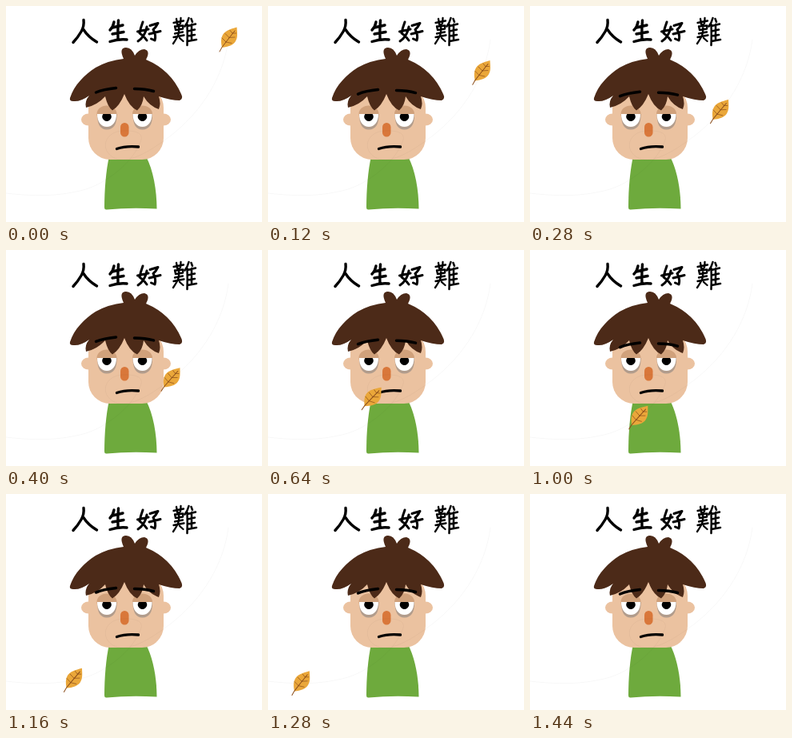
Recreate the animation shown at these times as an HTML page. Size 320x270 px, loop 1800 ms.

```html
<!DOCTYPE html>
<html lang="zh-Hant">
<head>
<meta charset="utf-8">
<title>人生好難</title>
<style>
  html, body { margin: 0; width: 100%; height: 100%; overflow: hidden; background: #fff; }
  svg { display: block; width: 100%; height: 100%; }
  .ink { fill: none; stroke: #000; stroke-linecap: round; stroke-linejoin: round; }
</style>
</head>
<body>
<svg viewBox="0 0 320 270">
  <defs>
    <g id="eye">
      <ellipse cy="135" rx="12.5" ry="10.5" fill="#d0a17b"/>
      <path d="M-12 135H12.5C13 148 8 154.500 0 154.500S-12 148-12 135Z" fill="#b19c8c"/>
      <path d="M-12 135H12C12 145 7 151 0 151S-12 145-12 135Z" fill="#fff"/>
      <path d="M-4.6 135H4.6A5.6 5.6 0 1 1-4.6 135Z"/>
    </g>
  </defs>

  <!-- hand lettering -->
  <g class="ink" role="img" aria-label="人生好難" stroke-width="3">
    <path stroke-width="3.4" d="M97 17.5Q98 25 94 32T84 45.5M96.5 29Q103 39 113.5 45"/>
    <path stroke-width="3.4" d="M135 20Q134 26 130 30M133 27L146 24M133 35L147 32.5M140.5 18Q139.5 30 140 42M130 44.5Q140 41 151 42"/>
    <path d="M171 20Q168 28 167 34Q172 37 176 43M176 26Q174 38 165 44M164.5 32L178 29M180 24.5L190 21.5Q188 26 184 29.5Q188 36 186 43L181.5 41M179 35L193 31.5"/>
    <path stroke-width="2.3" d="M209.5 21L222 18.5M213 16L214 23M218.5 15L218 22M211 25.5L212 30L221 28.5L221.5 24.5ZM216 23Q217 34 214 39T209 47M211 34.5L221 32.5M209.5 39L222.5 36.5M217 40L221.5 44"/>
    <path stroke-width="2.5" d="M228.5 15Q227 21 223.5 25.5M226.5 23Q227 36 226.5 49M231.5 16L233 20M227 25L237 22.5M227 31.5L236 29.5M227 37.5L236 36M227 44L238 42M232 23L232 43"/>
  </g>

  <!-- body -->
  <path d="M129 188C125 205 123 230 123 252Q123 255 126 254.500Q155 251.500 188.500 253.500C188.500 230 184 205 175 188Z" fill="#6eaa3d"/>
  <g fill="#ebc2a0">
    <ellipse cx="103" cy="142" rx="9" ry="7.5"/>
    <ellipse cx="197" cy="142" rx="9" ry="7.5"/>
    <rect x="103" y="100" width="94" height="92" rx="27"/>
  </g>
  <use href="#eye" x="126"/>
  <use href="#eye" x="170.5"/>
  <rect x="143" y="146" width="10.5" height="17.5" rx="5.2" fill="#d9773a"/>
  <path class="ink" stroke-width="3.4" d="M138.500 178.500Q150 174.500 165.500 176"/>

  <path fill="#4c2a18" d="M80 115C85 99 98 86 112 77Q128 68 147 66Q141 53 149 52T161 62Q166 54 173 54Q181 56 175 67Q206 80 219 110Q222 116 217 118Q206 118 191 113Q194 122 191 129Q179 125 172 113Q171 124 164 130.500Q154 126 148 110Q142 125 133 130.500Q127 126 124 113Q114 124 100 127Q98 119 104 112Q93 120 84 119Q79 119 80 115Z"/>
  <path id="brows" class="ink" stroke-width="3.5" d="M112.500 108Q122 104 137.500 102.500M160.500 103.500Q174 103.500 184.500 106.500"/>

  <!-- flight line, also faintly visible -->
  <path id="flight" fill="none" stroke="#000" stroke-opacity=".03" d="M278 42C272 88 246 130 208 160.500C185 178 155 199 135.500 190C117 181 122 157 146 156S172 163 167 172.500C156 198 122 224 94.500 230.500C60 239 28 238-16 232"/>

  <g id="leaf">
    <path d="M10.500-15.500C2-13-4-11-7-6S-9 5-8 10C0 9 6 7 9 2S11-8 10.500-15.500Z" fill="#eaa73a"/>
    <g fill="none" stroke="#8b4d1b" stroke-linecap="round" stroke-width=".7">
      <path stroke-width="1" d="M8-11Q0-1-8 9.500L-11 15"/>
      <path d="M5-8L2-11.500M1-2.500L-4-7.500M-3 3L-8-2M5-8L9.500-8M1-2.500L8-3M-3 3L4 4.500"/>
    </g>
  </g>
</svg>
<script>
const LOOP = 1800, STEP = 40, FALL = 1440;
const [flight, leaf, brows] = ['flight', 'leaf', 'brows'].map(id => document.getElementById(id));
const length = flight.getTotalLength();

function draw(now) {
  const t = Math.floor(now % LOOP / STEP) * STEP;
  const p = Math.min(1, t / FALL);

  // the leaf keeps a constant speed and leans a little in mid-flight
  const { x, y } = flight.getPointAtLength(length * p);
  const lean = 6 * Math.sin(Math.PI * p) ** 2;
  leaf.setAttribute('transform', `translate(${x} ${y}) rotate(${lean})`);

  // the brows sink and slow down
  brows.setAttribute('transform', `translate(0 ${17 * p * (1.5 - p / 2)})`);
}

const start = performance.now();
function tick() {
  draw(performance.now() - start);
  requestAnimationFrame(tick);
}
tick();
</script>
</body>
</html>
```
